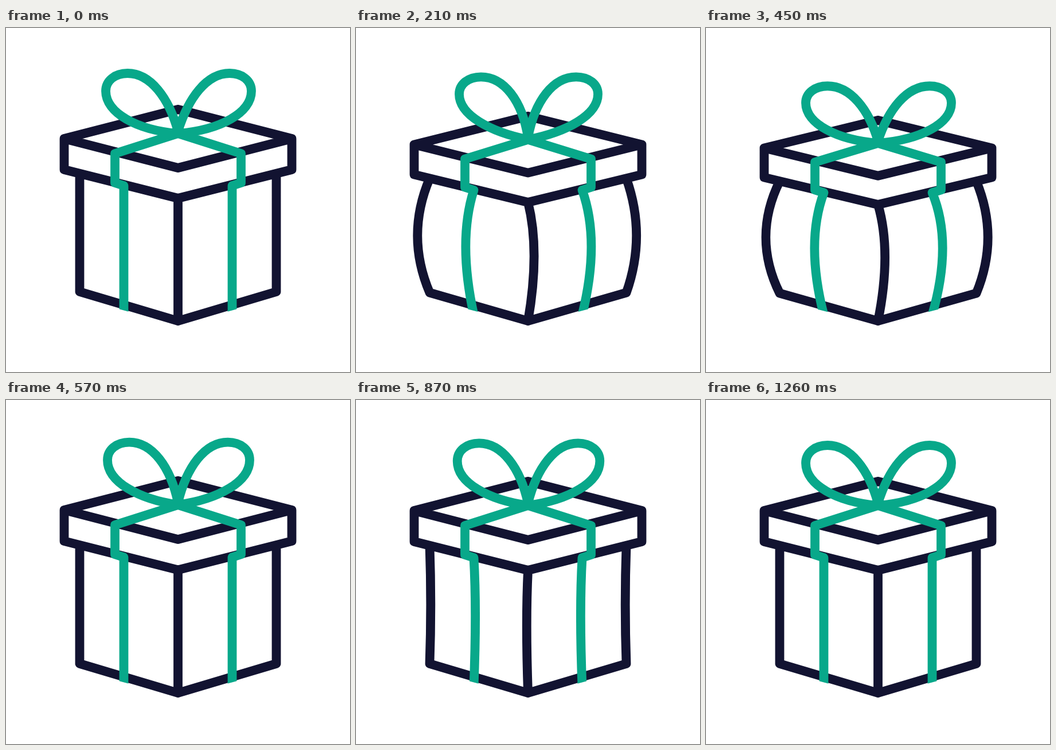
Recreate the animation shown at these times as an HTML page with a canvas. Size 600x600 px, loop 3320 ms.

```html
<!DOCTYPE html>
<html lang="en">
<head>
<meta charset="utf-8">
<title>Gift box</title>
<style>
  html, body { margin: 0; width: 100%; height: 100%; overflow: hidden; background: #fff; }
  canvas { display: block; width: 600px; height: 600px; }
</style>
</head>
<body>
<canvas id="stage" width="600" height="600"></canvas>
<script>
const ctx = document.getElementById('stage').getContext('2d');
const LOOP = 3320, ACTIVE = 1260, STEP = 30;
const MID = 300, FLOOR = 511;
const DARK = '#121331', GREEN = '#08a88a';

// Key poses of the bounce, one value per beat
const beats = [0, 210, 450, 690, 870, 1020, ACTIVE];
const squash = [0, .0325, .0515, -.058, 0, .0135, 0];
const bulge = [0, .875, 1, -1, -.2, 0, 0];
const pinch = [0, 1, 0, 1, .45, .45, 0];

// Smooth curve through the poses, flat at turning points
function at(values, t) {
  const slope = i => (values[i + 1] - values[i]) / (beats[i + 1] - beats[i]);
  const tangent = i => {
    if (i === 0 || i === beats.length - 1) return 0;
    const a = slope(i - 1), b = slope(i);
    return a * b > 0 ? 2 * a * b / (a + b) : 0;
  };
  let i = 0;
  while (i < beats.length - 2 && t >= beats[i + 1]) i++;
  const d = beats[i + 1] - beats[i], u = (t - beats[i]) / d, w = 1 - u;
  return values[i] * w * w * (1 + 2 * u) + values[i + 1] * u * u * (3 - 2 * u)
    + d * u * w * (tangent(i) * w - tangent(i + 1) * u);
}

// Points are [distance from the middle, y]; side is -1 or 1
function poly(side, points) {
  points.forEach(([dx, y], i) => ctx[i ? 'lineTo' : 'moveTo'](MID + side * dx, y));
}

// Vertical edge that bows sideways by dx; lean raises its widest point
function edge(x, y0, y1, dx, lean) {
  const c = x + dx * 4 / 3, h = y1 - y0;
  ctx.moveTo(x, y0);
  ctx.bezierCurveTo(c, y0 + h * (.33 - lean), c, y0 + h * (.67 - lean), x, y1);
}

function bow(side, q) {
  const p = (dx, y) => [MID + 1 + side * (dx - 6 * q), y - 8 * q];
  const curve = (a, b, c) => ctx.bezierCurveTo(...a, ...b, ...c);
  ctx.moveTo(MID, 184);
  curve(p(73, 178), p(127, 148), p(127, 110));
  curve(p(127, 92), p(111, 79), p(89, 79));
  curve(p(49, 79), p(17, 122), [MID, 180]);
  ctx.lineTo(MID, 184);
}

// Paths are squashed towards the floor; line widths are not
function squashed(scale, build) {
  ctx.save();
  ctx.translate(0, FLOOR);
  ctx.scale(1, scale);
  ctx.translate(0, -FLOOR);
  ctx.beginPath();
  for (const side of [-1, 1]) build(side);
  ctx.restore();
}

function stroke(color, scale, build) {
  squashed(scale, build);
  ctx.strokeStyle = color;
  ctx.stroke();
}

function draw(t) {
  const scale = 1 - at(squash, t), b = at(bulge, t), q = at(pinch, t);
  const bend = (out, inward) => b * (b > 0 ? out : inward);

  ctx.fillStyle = '#fff';
  ctx.fillRect(0, 0, 600, 600);
  ctx.lineWidth = 15.8;
  ctx.lineJoin = ctx.lineCap = 'round';

  stroke(DARK, scale, side => {
    edge(MID + side * 171.5, 254, 460, side * bend(22 - 2 * side, 9), 0);
    poly(side, [[171.5, 460], [0, FLOOR]]);
    poly(side, [[0, 142], [198.5, 193], [198.5, 247], [0, 297]]);
    poly(side, [[198.5, 193], [0, 244]]);
    edge(MID, 297, FLOOR, bend(12, 11), .06);
  });

  // The ribbon ends along the slanted lower rim of the box
  ctx.save();
  squashed(scale, side => poly(side, [[0, 0], [300, 0], [300, 437], [0, 518]]));
  ctx.clip();
  stroke(GREEN, scale, side => {
    poly(side, [[0, 184], [110, 219], [110, 270], [94.5, 275]]);
    edge(MID + side * 94.5, 275, 500, side * bend(17 + side, 13), .06);
    bow(side, q);
  });
  ctx.restore();
}

const start = performance.now();
function tick() {
  const t = (performance.now() - start) % LOOP;
  draw(Math.min(ACTIVE, Math.floor(t / STEP) * STEP));
  requestAnimationFrame(tick);
}
tick();
</script>
</body>
</html>
```
